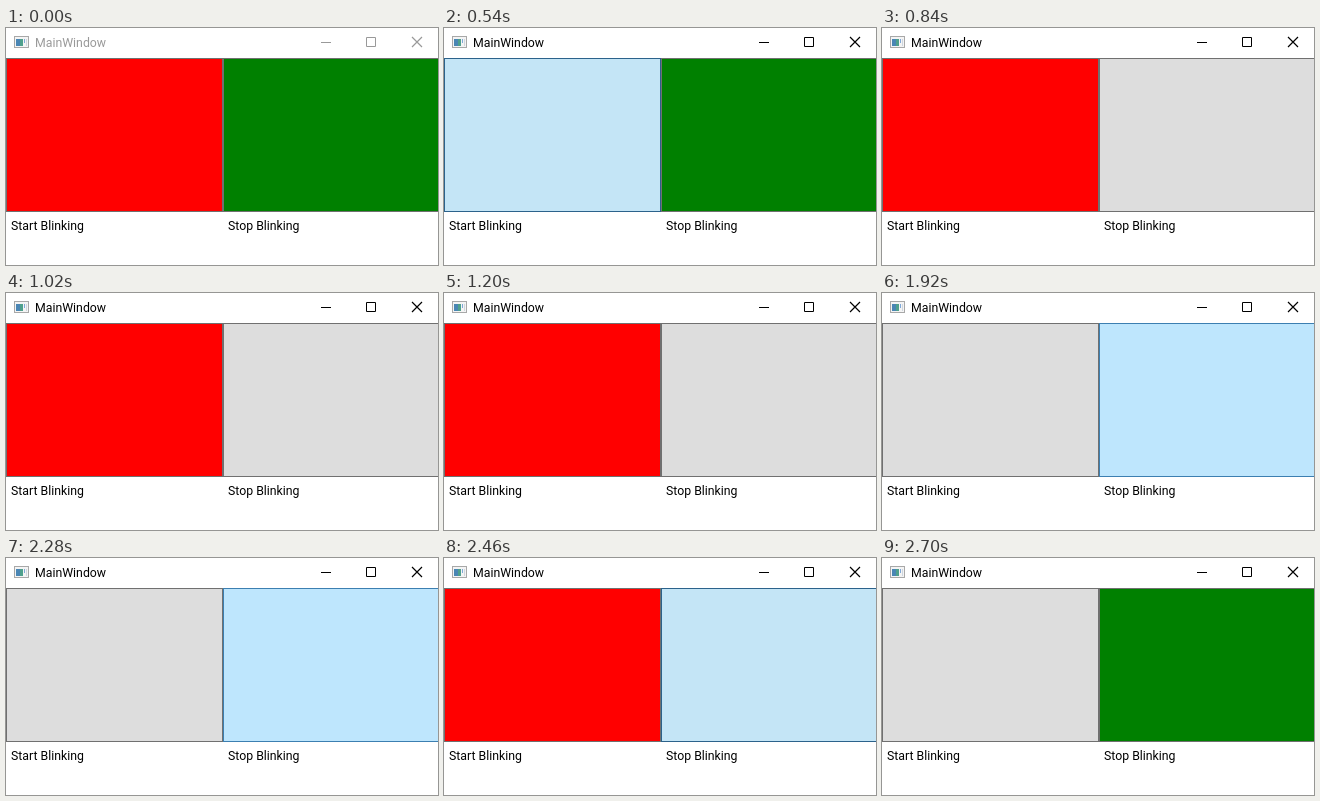
Animation, 432 px wide and 237 px high, one loop 3.18 s. Source, as an HTML page:

```html
<!DOCTYPE html>
<html lang="en">
<head>
<meta charset="utf-8">
<title>Blinking buttons</title>
<style>
html, body { margin: 0; width: 100%; height: 100%; overflow: hidden; background: #fff; }
svg { display: block; width: 432px; height: 237px; }
text { font: 12.3px Roboto, "Open Sans", sans-serif; }
</style>
</head>
<body>
<svg viewBox="0 0 432 237">
  <g id="icon" shape-rendering="crispEdges">
    <rect x="8.5" y="8.5" width="14" height="11" fill="#f4f4f4" stroke="#a8a8a8"/>
    <rect x="10" y="11" width="4" height="7" fill="#4a86b4"/>
    <rect x="14" y="11" width="3" height="7" fill="#4fa08c"/>
    <rect x="18" y="11" width="1" height="4" fill="#7fa8d8"/>
    <rect x="20" y="11" width="1" height="7" fill="#cfd6de"/>
  </g>
  <g id="caption">
    <text x="29" y="19" fill="currentColor">MainWindow</text>
    <g fill="none" stroke="currentColor">
      <path d="M315 14.5h10M360.5 9.5h9v9h-9z" stroke-linejoin="round"/>
      <path d="M406 9l10 10M416 9l-10 10" stroke-width="1.2"/>
    </g>
  </g>
  <rect id="left" x=".5" y="30.5" width="216" height="153"/>
  <rect id="right" x="217.5" y="30.5" width="216" height="153"/>
  <text x="5" y="202">Start Blinking</text>
  <text x="222" y="202">Stop Blinking</text>
</svg>
<script>
const LOOP = 3180;
const ACTIVATE = 540;
// Timer ticks: the grey button swaps sides on each one
const TICKS = [720, 840, 900, 1020, 1140, 1200, 1320, 1380, 1500, 1620,
  1680, 1800, 1920, 1980, 2100, 2220, 2280, 2400, 2520];
const POINTER = {
  left: { enter: 240, press: 540, release: 600, leave: 720 },
  right: { enter: 1800, press: 2460, release: 2580, leave: 2700 }
};
const HOVER = ['#bee6fd', '#3c7fb1'];
const PRESSED = ['#c4e5f6', '#2c628b'];
const BORDER = '#707070';
const GREY = '#dddddd';

const get = id => document.getElementById(id);
const within = (t, from, to) => t >= from && t < to;

function paint(id, t, color) {
  const p = POINTER[id];
  const [fill, stroke] = within(t, p.press, p.release) ? PRESSED
    : within(t, p.enter, p.leave) ? HOVER
    : [color, BORDER];
  get(id).setAttribute('fill', fill);
  get(id).setAttribute('stroke', stroke);
}

function draw(now) {
  const t = now % LOOP;
  const count = TICKS.filter(tick => tick <= t).length;
  paint('left', t, count % 2 ? GREY : '#ff0000');
  paint('right', t, count && count % 2 === 0 ? GREY : '#008000');
  get('caption').style.color = t < ACTIVATE ? '#999' : '#000';
}

const start = performance.now();
function frame() {
  draw(performance.now() - start);
  requestAnimationFrame(frame);
}
frame();
</script>
</body>
</html>
```
